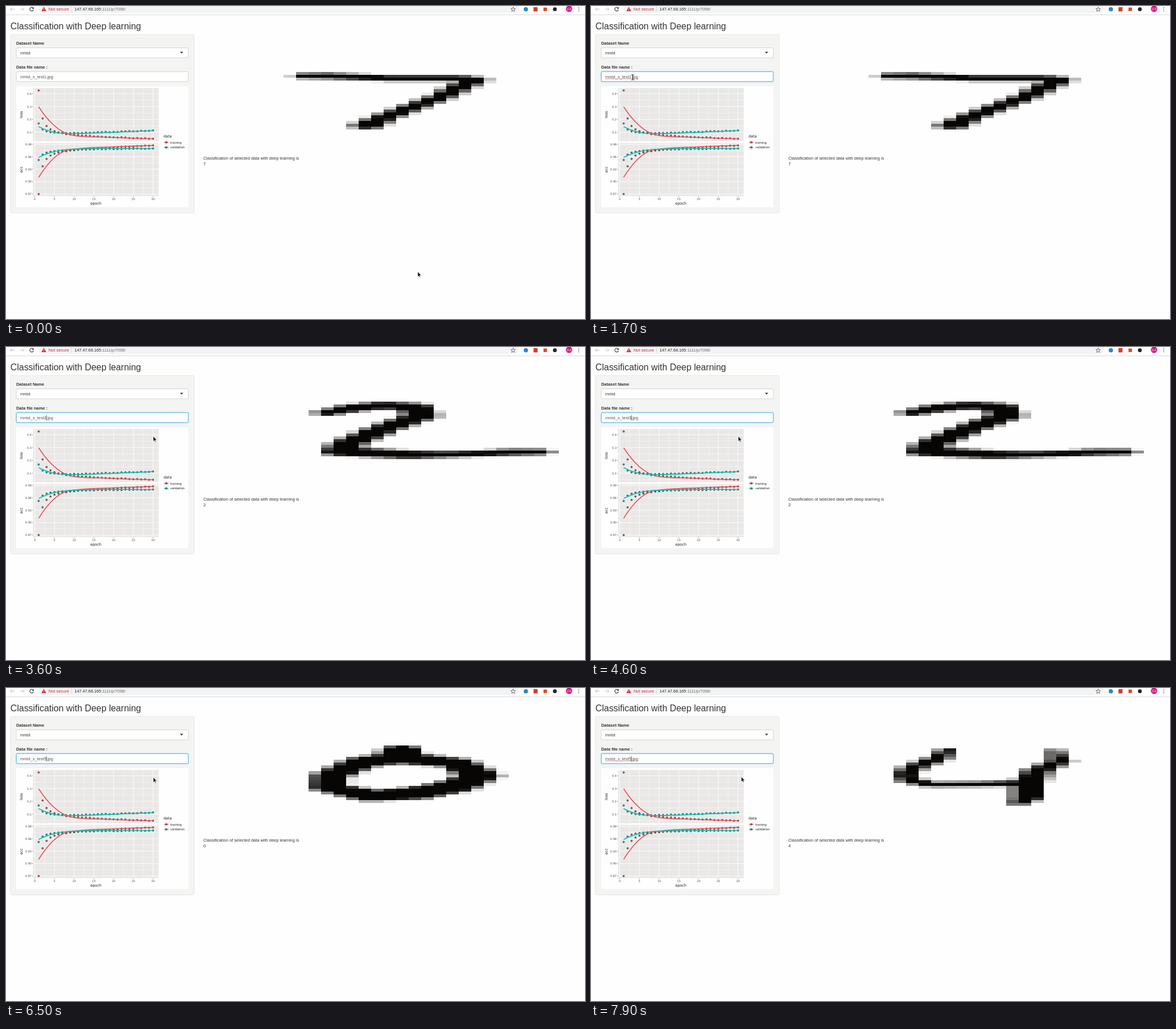
Write an HTML page with a canvas that moves like this. It is 1018 by 550 pixels and loops after 8000 ms.

```html
<!DOCTYPE html>
<html lang="en">
<head>
<meta charset="utf-8">
<title>Classification with Deep learning</title>
<style>
html, body { margin: 0; width: 100%; height: 100%; overflow: hidden; background: #fefefe; }
svg, canvas { position: absolute; display: block; }
svg { left: 0; top: 0; }
#digit { left: 378px; top: 80.7px; width: 616px; height: 141.7px; image-rendering: pixelated; }
text { font-family: "Liberation Sans", Arial, sans-serif; font-size: 7.45px; fill: #333; white-space: pre; }
.plot text { font-family: "DejaVu Sans", sans-serif; font-size: 5px; fill: #4d4d4d; }
.plot .name { font-size: 6.4px; fill: #111; }
.plot .key { font-size: 5.1px; fill: #111; }
.bold { font-weight: bold; }
</style>
</head>
<body>
<svg width="1018" height="550" viewBox="0 0 1018 550">
  <rect width="1018" height="15" fill="#fff"/>
  <rect x="57" y="-4" width="845" height="16" rx="8" fill="#f1f3f4"/>
  <path d="M0 15.5H1018" stroke="#d9d9d9"/>
  <g fill="none">
    <path d="M15 5.5H8M11 2.2 7.8 5.5 11 8.8" stroke="#bdbdbd"/>
    <path d="M24.5 5.5H31.5M28.5 2.2 31.7 5.5 28.5 8.8" stroke="#c8c8c8"/>
    <path d="M47.6 3.4A3.3 3.3 0 1 0 48.3 6.5" stroke="#444" stroke-width="1.2"/>
  </g>
  <path d="M48.8 1.6V5H45.4Z" fill="#444"/>
  <path d="M66.5 1.5 70.7 9H62.3Z" fill="#d0282e"/>
  <path d="M66.5 4V6.5M66.5 7.2V8.2" stroke="#fff" stroke-width=".8"/>
  <text x="74.7" y="8.3" style="font-size:7.5px;fill:#d0282e">Not secure</text>
  <path d="M115.5 1V10" stroke="#ccc" stroke-width=".7"/>
  <text x="120.5" y="8.3" style="font-size:7.3px;fill:#222">147.47.68.165<tspan fill="#6b6b6b">:1111/p/7098/</tspan></text>
  <path d="M891.7 1.7 892.8 4.5 895.7 4.7 893.4 6.6 894.2 9.5 891.7 7.9 889.2 9.5 890 6.6 887.7 4.7 890.6 4.5Z" fill="none" stroke="#555" stroke-width=".8"/>
  <circle cx="914" cy="5.7" r="3.8" fill="#2b86cc"/>
  <rect x="927.5" y="2" width="7" height="7.5" fill="#d93a20"/>
  <rect x="945" y="2.7" width="6.2" height="6.2" fill="#df4a2b"/>
  <circle cx="965" cy="5.7" r="3.4" fill="#262626"/>
  <circle cx="990" cy="5" r="5.6" fill="#d5147e"/>
  <text x="990" y="6.9" text-anchor="middle" style="font:5px 'Noto Sans CJK KR','Noto Sans CJK',sans-serif;fill:#fff">우리</text>
  <path d="M1007 2.5v.01M1007 5.5v.01M1007 8.5v.01" stroke="#444" stroke-width="1.6" stroke-linecap="round"/>

  <text x="7.8" y="41" style="font-size:15.9px">Classification with Deep learning</text>
  <rect x="7.8" y="50" width="323" height="313.5" rx="2" fill="#f4f4f3" stroke="#e1e1e0" stroke-width=".8"/>
  <text class="bold" x="18" y="67.8">Dataset Name</text>
  <rect x="18" y="73.5" width="302.5" height="17.5" rx="2" fill="#fefefe" stroke="#ccc" stroke-width=".8"/>
  <text x="25" y="84.8">mnist</text>
  <path d="M305.8 80.6H311.6L308.7 83.6Z" fill="#333"/>
  <text class="bold" x="18" y="109.5">Data file name :</text>
  <rect id="glow" x="17.5" y="114.7" width="303.5" height="18.6" rx="2.5" fill="none" stroke="#66c4ea" stroke-opacity=".3" stroke-width="2"/>
  <rect id="box" x="18.3" y="115.4" width="302" height="17.3" rx="2" fill="#fefefe"/>
  <text id="file" x="25" y="127" style="fill:#555"></text>
  <path id="spell" d="M25 128.2H83" stroke="#e05a5a" stroke-width=".8" opacity=".75"/>
  <path id="caret" d="M0 120V129.2" stroke="#222" stroke-width=".8"/>
  <g class="plot" id="plot"></g>
  <text x="347" y="269.5">Classification of selected data with deep learning is</text>
  <text id="answer" x="347" y="279.8"></text>
</svg>
<canvas id="digit" width="28" height="28"></canvas>
<svg width="1018" height="550" viewBox="0 0 1018 550">
  <path id="arrow" d="M0 0V8.8L2 7 3.3 10 4.6 9.4 3.3 6.5H6Z" fill="#111" stroke="#fff" stroke-width=".5"/>
  <path id="beam" d="M-2.5 -4.5H-.7L0 -4 .7 -4.5H2.5M0 -4V4M-2.5 4.5H-.7L0 4 .7 4.5H2.5" fill="none" stroke="#222" stroke-width=".9"/>
</svg>
<script>
const $ = id => document.getElementById(id);
const show = (id, on) => $(id).setAttribute('visibility', on ? 'visible' : 'hidden');
const move = (id, x, y) => $(id).setAttribute('transform', `translate(${x} ${y})`);
const clamp = v => Math.max(0, Math.min(1, v));
const mix = (a, b, u) => a + (b - a) * u;

// ---- training history plot ----
const RED = '#e6525c', TEAL = '#0fbfb1';
const epochX = e => 50.5 + 6.933 * e;
const line = (d, color, w) => `<path d="${d}" fill="none" stroke="${color}" stroke-width="${w}"/>`;
const label = (x, y, s, more = '') => `<text x="${x}" y="${y}" ${more}>${s}</text>`;
const dot = (x, y, c) => `<circle cx="${x}" cy="${y}" r="1.4" fill="${c}" stroke="#222" stroke-width=".7"/>`;

// gridlines start at value v0 on height y0 and go down by dv every dy
function panel(top, y0, dy, v0, dv, count, digits) {
  const bottom = top + 93.5;
  let s = `<rect x="47.5" y="${top}" width="221" height="93.5" fill="#eae8e7"/>`;
  for (let e = 0; e <= 30; e += 2.5)
    s += line(`M${epochX(e)} ${top}V${bottom}`, '#fff', e % 5 ? 0.4 : 0.8);
  for (let i = 0; i < count; i++) {
    const y = y0 + dy * i, half = y + dy / 2;
    s += line(`M47.5 ${y}H268.5`, '#fff', 0.8);
    if (half < bottom) s += line(`M47.5 ${half}H268.5`, '#fff', 0.4);
    s += line(`M46 ${y}H47.5`, '#333', 0.6);
    s += label(45, y + 1.8, (v0 - dv * i).toFixed(digits), 'text-anchor="end"');
  }
  return s;
}

// a straight trend plus an early gap that dies away as a power of the epoch
function dots(from, to, gap, power, color) {
  let s = '';
  for (let e = 1; e <= 30; e++) {
    const wobble = e > 6 ? 0.4 * Math.sin(e * e * power) : 0;
    s += dot(epochX(e), mix(from, to, e / 30) + gap / e ** power + wobble, color);
  }
  return s;
}

function drawPlot() {
  let s = '<rect x="18" y="141" width="302.5" height="212.5" fill="#fefefe"/>';
  s += panel(144, 154.2, 22.53, 0.4, 0.1, 4, 1);
  s += panel(240.5, 243, 21.88, 0.99, 0.03, 5, 2);
  for (let e = 0; e <= 30; e += 5) {
    s += line(`M${epochX(e)} 334V335.5`, '#333', 0.6);
    s += label(epochX(e), 341, e, 'text-anchor="middle"');
  }
  s += dots(227.2, 234, -79, 1.4, RED) + dots(227.2, 219.3, -20.5, 1.1, TEAL);
  s += dots(252.7, 244.4, 78, 1.4, RED) + dots(250.2, 249.6, 20.4, 0.9, TEAL);
  s += line('M57.4 177C74 203 94 221.5 113 226.3S150 229.5 175 230.5 220 232.8 258.5 233.3', RED, 1.6);
  s += line('M57.4 212C70 219 88 224 107 224.3S180 222.5 258.5 219', TEAL, 1.6);
  s += line('M57.4 301C70 281 88 257 110 252.8S175 248 258.5 245', RED, 1.6);
  s += line('M57.4 266C72 259 90 253 110 252S180 249.5 258.5 250.5', TEAL, 1.6);
  const name = 'class="name" text-anchor="middle"';
  s += label(158, 349, 'epoch', name);
  s += label(0, 0, 'loss', name + ' transform="translate(28.5 190.8) rotate(-90)"');
  s += label(0, 0, 'acc', name + ' transform="translate(28.5 287.5) rotate(-90)"');
  s += label(277, 231.3, 'data', 'class="name"');
  [['training', RED], ['validation', TEAL]].forEach(([t, c], i) => {
    const y = 239.6 + 8.9 * i;
    s += `<rect x="277.5" y="${y - 4.2}" width="8.5" height="8.4" fill="#f3f2f2"/>`;
    s += line(`M278.3 ${y}H285.3`, c, 1.5) + dot(281.8, y, c);
    s += label(289, y + 1.9, t, 'class="key"');
  });
  $('plot').innerHTML = s;
}

// ---- handwritten digits: brush strokes through [x, y, radius] on a 28 x 28 grid ----
const strokes = {
  7: [[[6.7, 8.4, 0.9], [8.5, 8.4, 1], [13.5, 9.2, 1], [19, 9.2, 1], [20.2, 9.8, 1.1],
       [17.6, 15.5, 0.98], [13.2, 22.5, 1.05], [11.7, 25.6, 1.25]]],
  2: [[[8.5, 6.9, 1], [10.5, 5.3, 1.3], [13, 4.3, 1.25], [15.5, 5, 1.4], [16, 8, 1.35],
       [13, 12.5, 1.3], [10.1, 17.5, 1.35], [9.6, 20.3, 1.55], [15, 21.45, 1.4],
       [18, 21.35, 1.05], [21, 21, 1], [23, 20.6, 1.1], [25.5, 20.5, 0.95]]],
  1: [[[17.5, 4.8, 0.8], [16.1, 9.5, 0.85], [14, 16.5, 0.92], [12, 22.8, 1.1]]],
  0: [[[14.4, 5.6, 1.6], [14.3, 8.4, 2], [11.5, 9.7, 1.7], [8.7, 14.5, 1.4], [8.6, 18.5, 1.45],
       [12, 21.5, 1.85], [15.5, 20.6, 2.1], [18.5, 18.4, 1.9], [20.7, 14.5, 1.6],
       [18.7, 10.1, 1.6], [14.3, 8.4, 2]]],
  4: [[[11.3, 5.7, 0.7], [10.6, 8.5, 0.88], [8.7, 11.5, 0.95], [7.9, 14, 0.9], [8.4, 16.2, 0.95],
       [10, 17.5, 0.83], [14, 17.4, 0.83], [17.6, 17, 1]],
      [[19.9, 5.9, 0.5], [20.3, 9.5, 0.9], [18.5, 13, 1.1], [17.75, 17, 1.25], [17.75, 22, 1.25], [17, 24, 0.75]]]
};
const pen = $('digit').getContext('2d');
pen.fillStyle = '#080605';
let shown = null;

// how much of the cell centred on x, y the brush covers between two points
function cover(x, y, [ax, ay, ar], [bx, by, br]) {
  const dx = bx - ax, dy = by - ay;
  const u = clamp(((x - ax) * dx + (y - ay) * dy) / (dx * dx + dy * dy));
  return clamp(mix(ar, br, u) + 0.5 - Math.hypot(x - ax - dx * u, y - ay - dy * u));
}

function drawDigit(n) {
  if (n === shown) return;
  shown = n;
  pen.clearRect(0, 0, 28, 28);
  for (let y = 0; y < 28; y++) for (let x = 0; x < 28; x++) {
    let ink = 0;
    for (const s of strokes[n])
      for (let i = 1; i < s.length; i++) ink = Math.max(ink, cover(x + 0.5, y + 0.5, s[i - 1], s[i]));
    pen.globalAlpha = ink;
    pen.fillRect(x, y, 1, 1);
  }
  $('answer').textContent = n;
}

// ---- timeline in ms ----
const FOCUS = 1600, CARET_LEFT = 2700, BLINK = 600, SPELL_DELAY = 1000;
const edits = [
  { erase: 2900, type: 3100, done: 3600, answer: 2 },
  { erase: 4300, type: 4600, done: 4900, answer: 1 },
  { erase: 5300, type: 5700, done: 6000, answer: 0 },
  { erase: 6300, type: 6500, done: 6900, answer: 4 }
];
const keys = [FOCUS, CARET_LEFT, ...edits.flatMap(e => [e.erase, e.type])];
const moves = [
  { from: 0, to: 900, x: 89, y: 133 },
  { from: 1000, to: 1400, x: 73.5, y: 125.5 },
  { from: 1700, to: 1900, x: 259, y: 157 },
  { from: 7800, to: 7900, x: 264.3, y: 156 }
];

function drawField(t) {
  const focus = t >= FOCUS;
  const typed = edits.filter(e => e.type <= t).length;
  const erased = edits.filter(e => e.erase <= t).length;
  const n = erased > typed ? '' : typed + 1;
  const key = keys.filter(k => k <= t).pop();
  $('file').textContent = `mnist_x_test${n}.jpg`;
  $('box').setAttribute('stroke', focus ? '#55b9e4' : '#ccc');
  $('box').setAttribute('stroke-width', focus ? 1 : 0.8);
  show('glow', focus);
  show('caret', focus && (t - key) % (2 * BLINK) < BLINK);
  show('spell', focus && (key === FOCUS || t - key >= SPELL_DELAY));
  move('caret', 66.9 + (n ? 4.1 : 0) + (t < CARET_LEFT ? 2.1 : 0), 0);
}

function drawPointer(t) {
  let x = 724, y = 467;
  for (const m of moves) {
    const u = clamp((t - m.from) / (m.to - m.from)), k = u * u * (3 - 2 * u);
    x = mix(x, m.x, k);
    y = mix(y, m.y, k);
  }
  const overField = t >= 1100 && t < 1800;
  show('arrow', !overField);
  show('beam', overField);
  move(overField ? 'beam' : 'arrow', x, y);
}

function render(t) {
  const last = edits.filter(e => e.done <= t).pop();
  drawDigit(last ? last.answer : 7);
  drawField(t);
  drawPointer(t);
}

drawPlot();
function tick() {
  render(Math.floor(performance.now() % 8000 / 100) * 100);
  requestAnimationFrame(tick);
}
tick();
</script>
</body>
</html>
```
